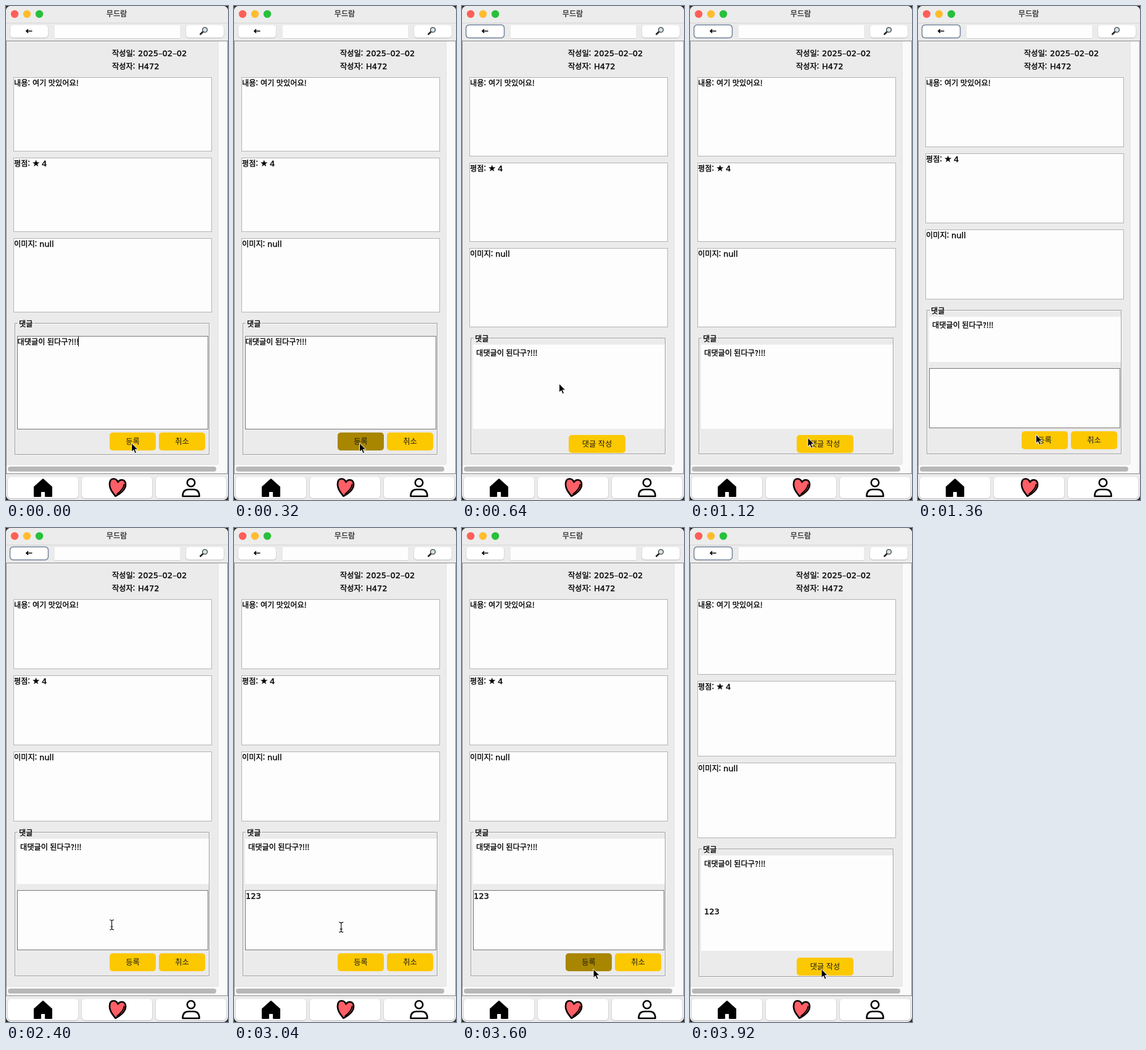
An HTML page that plays this animation: 360 px wide and 798 px high, repeating every 4 s.

```html
<!DOCTYPE html>
<html lang="ko">
<head>
<meta charset="utf-8">
<title>무드람</title>
<style>
html, body { margin: 0; width: 100%; height: 100%; overflow: hidden; background: #2a2a2a; }
svg { display: block; width: 360px; height: 798px; }
.ko { font: 500 12.2px "Noto Sans CJK KR", "Noto Sans CJK", sans-serif; }
.la { font: 13px "DejaVu Sans", sans-serif; }
.ko, .la { stroke: #000; stroke-width: .35px; }
.label { stroke: none; fill: #1c1a10; }
.title { font-weight: 700; fill: #404040; stroke: none; }
.mid { text-anchor: middle; }
</style>
</head>
<body>
<svg viewBox="0 0 360 798" xmlns="http://www.w3.org/2000/svg">
  <defs><clipPath id="win"><rect width="360" height="798" rx="8"/></clipPath></defs>
  <g clip-path="url(#win)">
    <g id="frame"></g>
    <g id="page"></g>
  </g>
  <path id="arrow" d="M0 0V14.3L3.3 11.2L5.6 16.6L8.1 15.5L5.8 10.3H10.3Z" stroke="#fff" stroke-width="1"/>
  <g id="beam" fill="none">
    <path d="M-3.5 -8Q0 -8 0 -5.5Q0 -8 3.5 -8M0 -6V6M-3.5 8Q0 8 0 5.5Q0 8 3.5 8M-2 3H2" stroke="#fff" stroke-width="2.6"/>
    <path d="M-3.5 -8Q0 -8 0 -5.5Q0 -8 3.5 -8M0 -6V6M-3.5 8Q0 8 0 5.5Q0 8 3.5 8M-2 3H2" stroke="#111" stroke-width="1.2"/>
  </g>
</svg>
<script>
const LOOP = 4000, STEP = 80;
const $ = id => document.getElementById(id);

const rect = (x, y, w, h, fill, more = '') =>
  `<rect x="${x}" y="${y}" width="${w}" height="${h}" fill="${fill}" ${more}/>`;
const path = (d, stroke, more = '') => `<path d="${d}" stroke="${stroke}" fill="none" ${more}/>`;
const text = (x, y, s, cls = 'ko') => `<text x="${x}" y="${y}" class="${cls}">${s}</text>`;
const outlined = (x, y, w, h, stroke) =>
  rect(x + .5, y + .5, w - 1, h - 1, '#fdfdfd', `stroke="${stroke}"`);
const whiteButton = (x, y, w, h) =>
  rect(x - .5, y, w + 1, h + 1.3, '#c6c6c6', 'rx="5"') + rect(x, y, w, h, '#fff', 'rx="4.5"');
const goldButton = (x, y, w, label, down) =>
  rect(x, y, w, 29, down ? '#a88600' : '#fcc800', 'rx="5"') +
  text(x + w / 2, y + 19, label, 'ko label mid');

function frame() {
  const lights = ['#ff5f57', '#febc2e', '#28c03c'].map((c, i) =>
    `<circle cx="${14 + 20 * i}" cy="13" r="6.2" fill="${c}"/>`).join('');
  const home = `<path d="M60 764.500L74 777V792H64V785.500Q64 784 62.500 784H57.500Q56 784 56 785.500V792H46V777Z"
    stroke="#000" stroke-width="2" stroke-linejoin="round"/>`;
  const heart = `<g transform="rotate(10 180 778)" stroke="#000" stroke-linejoin="round" stroke-linecap="round">
    <path d="M180 769C176.500 763 167 763 167 772C167 781 174 787 180 792
      C187 787 194 779 193 771C192 763 183 762 180 769Z" fill="#ff5f66" stroke-width="2.6"/>
    <path d="M190.500 771C190.500 778 187 783 182 788" fill="none" stroke-width="2"/></g>`;
  const person = `<circle cx="300" cy="770" r="6.2" fill="none" stroke="#000" stroke-width="2.6"/>` +
    path('M286.500 792C286.500 784.500 290 781 296 781H304C310 781 313.500 784.500 313.500 792Z', '#000',
      'stroke-width="2.6" stroke-linejoin="round"');
  const lens = path('M319.500 41.500L315.300 45.500', '#222', 'stroke-width="2.6" stroke-linecap="round"') +
    '<circle cx="322.500" cy="38.500" r="3.900" fill="#d3e3ea" stroke="#444" stroke-width="1.400"/>';
  return rect(0, 0, 360, 798, '#ebebeb') +
    rect(0, 0, 360, 27, '#ececec') + rect(0, 27, 360, 1, '#d4d4d4') + lights +
    text(179.5, 17, '무드람', 'ko title mid') +
    whiteButton(7, 31, 61, 20) + whiteButton(292, 31, 61, 20) +
    path('M33 40.500H42.500M36 37.700L33 40.500L36 43.300', '#000', 'stroke-width="1.7"') + lens +
    rect(79, 31, 203, 21, '#fdfdfd') + rect(79, 52, 203, 1, '#cfcfcf') +
    rect(.5, 56.5, 359, 699, '#ebebeb', 'stroke="#8c8c8c"') +
    rect(344, 57, 15, 683, '#fafafa') + rect(343.5, 57, 1, 683, '#dedede') +
    rect(1, 740, 358, 15, '#fafafa') + rect(1, 740, 343, 1, '#e2e2e2') +
    rect(3, 744, 338, 8, '#b8b8b8', 'rx="4"') +
    [3, 123, 243].map(x => whiteButton(x, 761, 114, 34)).join('') + home + heart + person +
    text(172, 81, '작성일:') + text(214, 81, '2025–02–02', 'la') +
    text(172, 102, '작성자:') + text(214, 102, 'H472', 'la');
}

// Row height, comment panel top and bottom, list area, input area, button top
const layouts = {
  firstForm: { row: 120, top: 513, end: 725, input: [533, 151], btn: 689 },
  firstList: { row: 128, top: 537, end: 724, list: [547, 136], btn: 693 },
  nextForm: { row: 113, top: 492, end: 724, list: [502, 73], input: [585, 97], btn: 687 },
  nextList: { row: 122, top: 519, end: 725, list: [529, 154], btn: 694 }
};
const layoutAt = t => layouts[
  t < 400 ? 'firstForm' : t < 1360 ? 'firstList' : t < 3680 ? 'nextForm' : 'nextList'];

const within = (t, a, b) => t >= a && t < b;
const reply = '대댓글이 된다구?!!!';

function rows(h) {
  const items = [
    ['내용:', 43, '여기 맛있어요!', 'ko'],
    ['평점:', 58, '4', 'la'],
    ['이미지:', 54, 'null', 'la']
  ];
  return items.map(([label, x, value, cls], i) => {
    const y = 115 + i * (h + 10);
    const star = i === 1 ? `<path transform="translate(48.700 ${y + 9.5})"
      d="M0 -6L1.400 -1.900H5.700L2.200 .700L3.500 4.800L0 2.300L-3.500 4.800L-2.200 .700L-5.700 -1.900H-1.400Z"/>` : '';
    return outlined(12, y, 322, h, '#b4b4b4') + text(13, y + 14, label) +
      text(x, y + 14, value, cls) + star;
  }).join('');
}

function panel(top, end) {
  const edge = (d, c) => path(`M${19 + d} ${top + d - .5}H${14.5 + d}V${end + d - .5}H${329.5 + d}V${top + d - .5}H${45 + d}`, c);
  return edge(1, '#fafafa') + edge(0, '#9c9c9c') + text(21, top + 5, '댓글');
}

function page(t) {
  const L = layoutAt(t), first = L === layouts.firstForm;
  const down = within(t, 240, 400) || within(t, 1200, 1360) || within(t, 3520, 3680);
  const backFocus = within(t, 400, 2560) || t >= 3680;
  let out = rows(L.row) + panel(L.top, L.end);

  if (backFocus) out += rect(6.5, 30.5, 62, 21, 'none', 'rx="5" stroke="#73849c" stroke-width="1.500"');
  if (L.list) {
    const [y, h] = L.list;
    out += rect(18, y, 311, h, '#fdfdfd') + text(23, y + 18, reply);
    if (L === layouts.nextList) out += text(23, y + 95, '123', 'la');
  }
  if (L.input) {
    const [y, h] = L.input;
    const count = first ? 0 : [2720, 2880, 2960].filter(k => t >= k).length;
    const caret = first ? t < 240 : within(t, 2560, 3040);
    const caretX = first ? 117 : 19 + 8.27 * count;
    out += outlined(18, y, 310, h, '#777');
    out += first ? text(18.5, y + 14, reply) : text(19, y + 14, '123'.slice(0, count), 'la');
    if (caret) out += rect(Math.round(caretX), y + 1, 1, 16, '#000');
    out += goldButton(168, L.btn, 75, '등록', down) + goldButton(248, L.btn, 75, '취소');
  } else {
    out += goldButton(173, L.btn, 92, '댓글 작성', down);
  }
  return out;
}

// Pointer stops: time, x, y
const stops = [
  [0, 203.5, 706], [400, 203.5, 706], [640, 157.5, 610], [720, 157.5, 610],
  [1120, 191, 697.5], [1280, 191, 697.5], [1440, 191.5, 687], [1680, 191.5, 687],
  [2240, 171.5, 641], [2960, 171.5, 641], [3520, 213, 712.5], [LOOP, 213, 712.5]
];

function pointer(t) {
  const i = stops.findIndex(s => s[0] > t);
  const [t0, x0, y0] = stops[i - 1], [t1, x1, y1] = stops[i];
  const k = (t - t0) / (t1 - t0), e = k * k * (3 - 2 * k);
  return [x0 + (x1 - x0) * e, y0 + (y1 - y0) * e];
}

let last = -1;
function render(now) {
  const t = Math.floor(now % LOOP / STEP) * STEP;
  if (t === last) return;
  last = t;
  $('page').innerHTML = page(t);
  const [x, y] = pointer(t), box = layoutAt(t).input;
  const typing = !!box && within(y, box[0], box[0] + box[1]);
  for (const id of ['arrow', 'beam']) {
    $(id).setAttribute('transform', `translate(${x} ${y})`);
    $(id).style.display = (id === 'beam') === typing ? '' : 'none';
  }
}

$('frame').innerHTML = frame();
const start = performance.now();
function tick() {
  render(performance.now() - start);
  requestAnimationFrame(tick);
}
tick();
</script>
</body>
</html>
```
